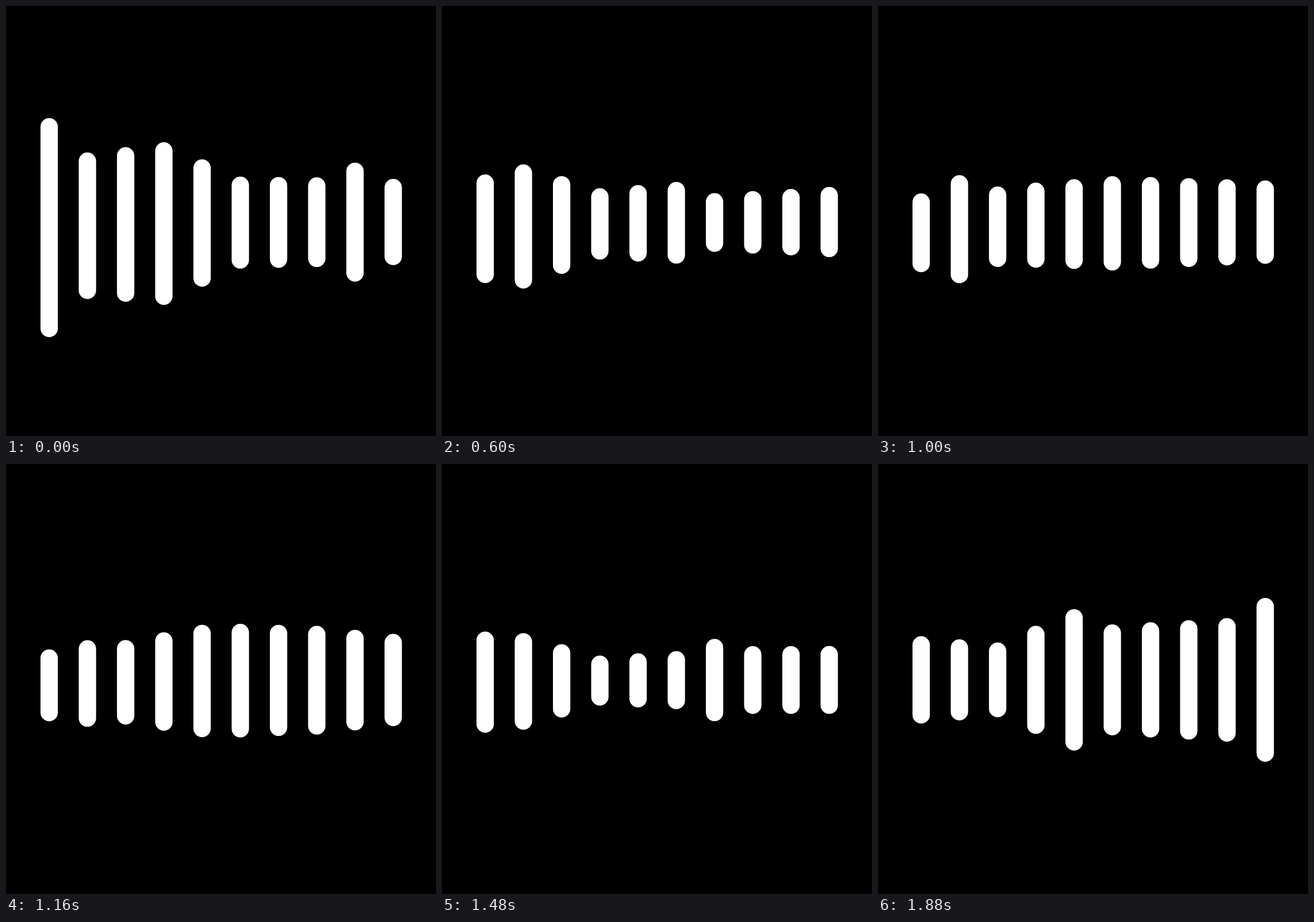
Recreate the animation shown at these times as an HTML page. Size 748x748 px, loop 1.92 s.

```html
<!DOCTYPE html>
<html lang="en">
<head>
<meta charset="utf-8">
<title>Sound bars</title>
<style>
  html, body { margin: 0; width: 100%; height: 100%; overflow: hidden; background: #000; }
  svg { display: block; width: 100%; height: 100%; }
  line { stroke: #fff; stroke-width: 30.2; stroke-linecap: round; }
</style>
</head>
<body>
<svg id="stage" viewBox="0 0 748 748"></svg>
<script>
const LOOP = 1920, STEP = 40, COUNT = 10;
const FIRST_X = 75.1, GAP = 66.5, MIDDLE = 375.5, CAP = 15.1;

// A pose is an outline through a few [bar, height] points;
// lean lowers the leftmost bars.
const poses = [
  { at: 0, lean: 10, outline: [[0, 381], [1, 255], [3, 283], [5, 160], [7, 156], [8, 207], [9, 150]] },
  { at: 320, lean: 1, outline: [[0, 170], [2, 152], [5, 130], [8, 123], [9, 164]] },
  { at: 600, lean: 12, outline: [[0, 189], [1, 216], [3, 124], [5, 142], [6, 102], [9, 122]] },
  { at: 1000, lean: 19, outline: [[0, 137], [1, 188], [2, 140], [5, 164], [9, 145]] },
  { at: 1320, lean: 0, outline: [[1, 113], [4, 235], [7, 224], [9, 176]] },
  { at: 1480, lean: 4, outline: [[0, 176], [1, 168], [3, 87], [5, 101], [6, 143], [7, 118]] },
  { at: 1880, lean: 0, outline: [[0, 152], [2, 130], [4, 246], [5, 193], [8, 215], [9, 285]] }
];

const mix = (a, b, u) => a + (b - a) * u;

// Straight lines between points, held level beyond the ends.
function sample(points, x) {
  const next = points.findIndex(point => point[0] >= x);
  if (next < 0) return points[points.length - 1][1];
  if (next === 0) return points[0][1];
  const [x0, y0] = points[next - 1], [x1, y1] = points[next];
  return mix(y0, y1, (x - x0) / (x1 - x0));
}

const stage = document.getElementById("stage");
const bars = Array.from({ length: COUNT }, (_, i) => {
  const bar = document.createElementNS("http://www.w3.org/2000/svg", "line");
  const x = FIRST_X + GAP * i;
  bar.setAttribute("x1", x);
  bar.setAttribute("x2", x);
  return stage.appendChild(bar);
});

function draw(time) {
  const t = Math.floor((time % LOOP) / STEP) * STEP;
  const next = Math.max(1, poses.findIndex(pose => pose.at >= t));
  const from = poses[next - 1], to = poses[next];
  const u = (t - from.at) / (to.at - from.at);
  const lean = mix(from.lean, to.lean, u);

  bars.forEach((bar, i) => {
    const height = mix(sample(from.outline, i), sample(to.outline, i), u);
    const center = MIDDLE + lean * Math.exp(-i / 2.5);
    const reach = height / 2 - CAP;
    bar.setAttribute("y1", center - reach);
    bar.setAttribute("y2", center + reach);
  });
}

const start = performance.now();
function tick() {
  draw(performance.now() - start);
  requestAnimationFrame(tick);
}
draw(0);
requestAnimationFrame(tick);
</script>
</body>
</html>
```
